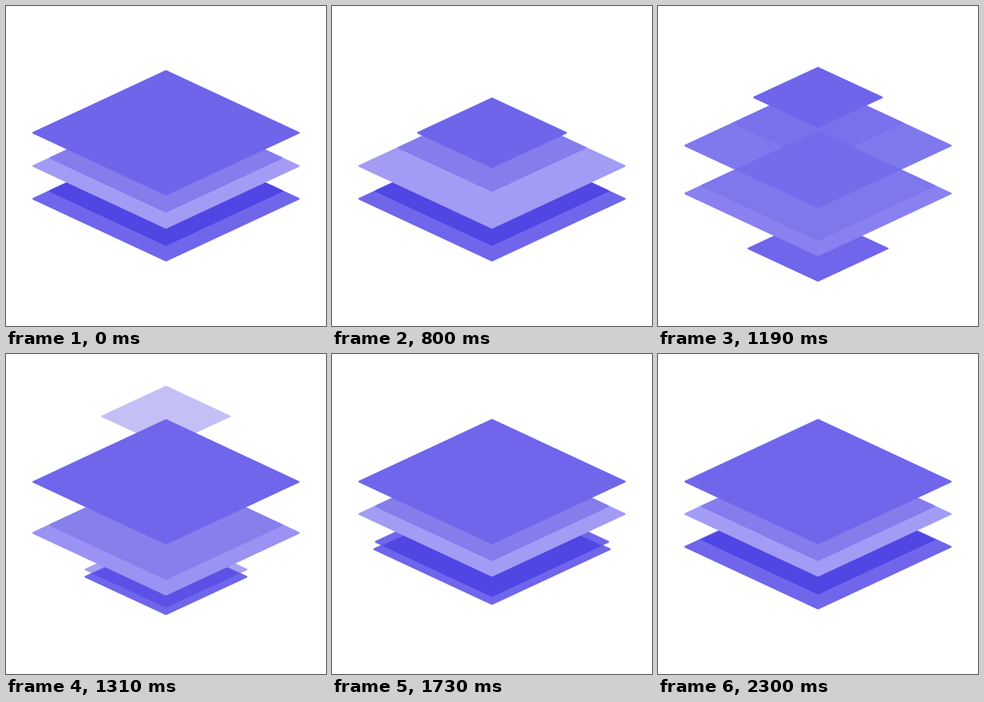
An HTML page that plays this animation: 400 px wide and 400 px high, repeating every 2.33 s.

```html
<!DOCTYPE html>
<html lang="en">
<head>
<meta charset="utf-8">
<title>Layer stack</title>
<style>
  html, body { margin: 0; width: 100%; height: 100%; overflow: hidden; background: #fff; }
  svg { display: block; width: 100%; height: 100%; }
  path { stroke-width: 2; stroke-linejoin: round; }
</style>
</head>
<body>
<svg id="stage" viewBox="0 0 400 400">
  <clipPath id="floor"><path id="floorShape"/></clipPath>
</svg>
<script>
const LOOP = 2330, START = 530, STEP = 30;
const HALF_W = 167, HALF_H = 78;
const BASE = '#6f66eb', LIGHT = '#a39cf5', LIGHT_SHADE = '#857dec', DARK = '#5046e4';
const stage = document.getElementById('stage');
const floorShape = document.getElementById('floorShape');

function add(color, clip) {
  const el = document.createElementNS('http://www.w3.org/2000/svg', 'path');
  el.setAttribute('fill', color);
  el.setAttribute('stroke', color);
  if (clip) el.setAttribute('clip-path', clip);
  return stage.appendChild(el);
}

// Listed from back to front
const spill = add(BASE), nextLow = add(BASE), nextLowShade = add(DARK, 'url(#floor)');
const low = add(BASE), lowShade = add(DARK);
const nextMid = add(LIGHT), nextMidShade = add(LIGHT_SHADE);
const mid = add(LIGHT), midShade = add(LIGHT_SHADE);
const flyer = add('#6e65eb');
const nextTop = add(BASE);

const clamp = x => Math.max(0, Math.min(1, x));
const span = (t, a, b) => clamp((t - a) / (b - a));
const sine = u => 0.5 - 0.5 * Math.cos(Math.PI * u);
const easeOut = (u, n) => 1 - (1 - u) ** n;
const mix = (a, b, u) => a + (b - a) * u;

function diamond(cy, scale) {
  const w = HALF_W * scale - 1, h = HALF_H * scale - 0.7;
  return `M200 ${cy - h}L${200 + w} ${cy}L200 ${cy + h}L${200 - w} ${cy}Z`;
}

function put(el, cy, scale, opacity) {
  el.setAttribute('d', diamond(cy, scale));
  el.setAttribute('opacity', opacity);
}

// A shade shares the upper corner of the layer it lies on
function putShade(el, cy, scale, opacity) {
  put(el, cy - HALF_H * (1 - scale), scale, opacity);
}

function draw(t) {
  // Top layer shrinks, then flies off
  put(flyer,
    mix(158.5, 70, sine(span(t, 995, 1385))),
    mix(1, 0.485, sine(span(t, 500, 900))),
    1 - span(t, 1200, 1385));

  // Middle layer rises and becomes the top
  const rise = sine(span(t, 995, 1329));
  const topY = mix(200, 159.5, rise);
  const midOpacity = 1 - span(t, 1070, 1310);
  put(mid, topY, 1, midOpacity);
  putShade(midShade, topY, mix(0.872, 0.638, easeOut(span(t, 512, 1137), 2)), midOpacity);
  put(nextTop, topY, 1, span(t, 1040, 1223));

  // Bottom layer rises and becomes the middle
  const midY = mix(241, 200, sine(span(t, 1025, 1655)));
  const lighten = span(t, 1010, 1370);
  const lowOpacity = lighten < 1 ? 1 : 0;
  put(low, midY, 1, lowOpacity);
  putShade(lowShade, midY, 0.875, lowOpacity);
  put(nextMid, midY, 1, lighten);
  putShade(nextMidShade, midY, 0.875, lighten);

  // New bottom layer comes up from below and grows
  const lowY = mix(333, 241, easeOut(span(t, 1085, 2205), 4));
  const v = clamp((2300 - t) / 1215) * 1215 / 1110;
  const size = 1 - 1.2 * v ** 3 + 0.728 * v ** 4;
  const shadeSize = Math.min(size, 0.877);
  const shadeOpacity = span(t, 1200, 1380);
  put(nextLow, lowY, size, span(t, 1060, 1140));
  put(spill, lowY - 9.2, shadeSize, shadeOpacity);
  put(nextLowShade, lowY - 9.2, shadeSize, shadeOpacity);
  floorShape.setAttribute('d', diamond(lowY, size));
}

function tick(now) {
  const t = now % LOOP;
  draw(t < START ? 0 : START + Math.floor((t - START) / STEP) * STEP);
  requestAnimationFrame(tick);
}
draw(0);
requestAnimationFrame(tick);
</script>
</body>
</html>
```
